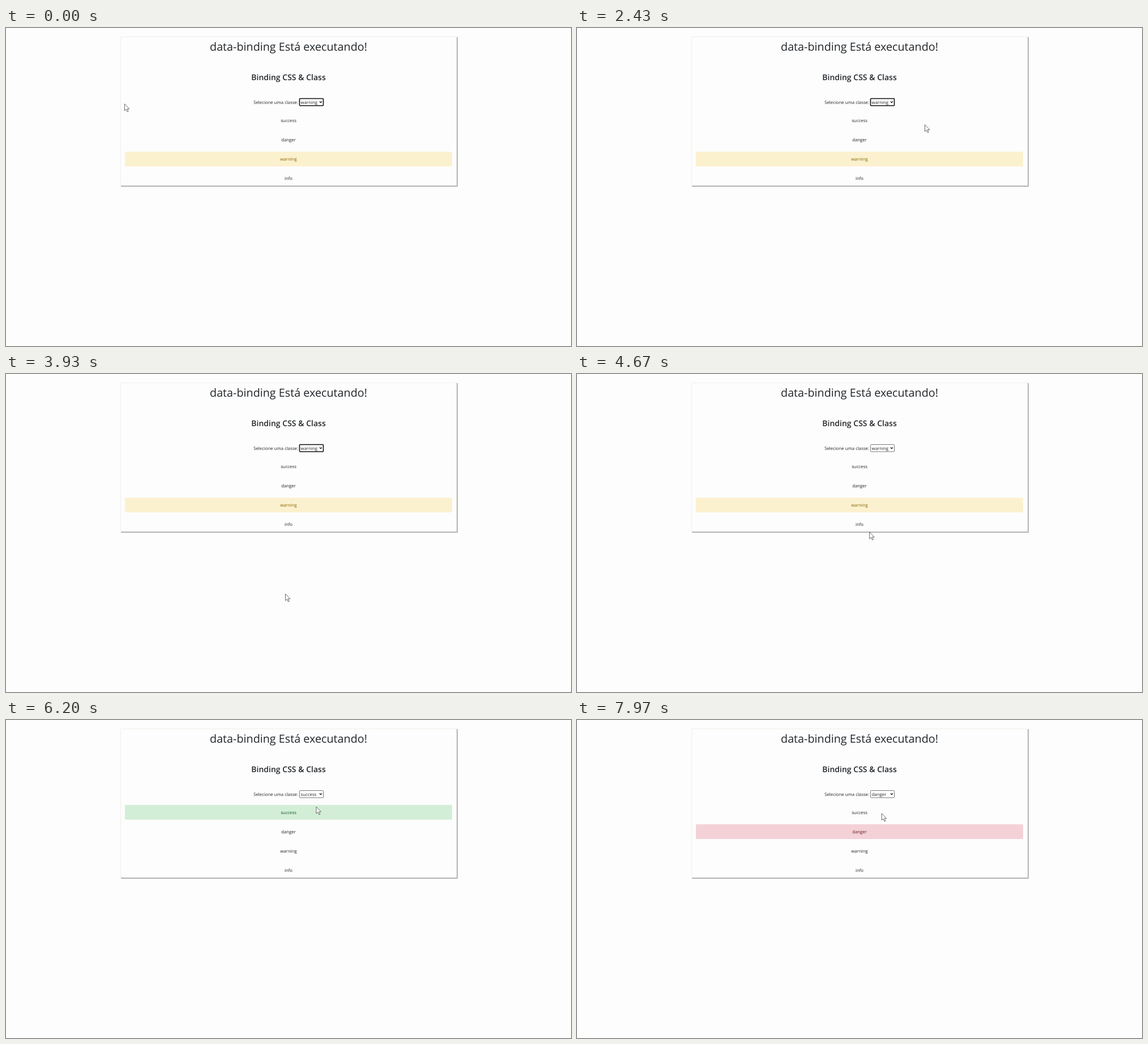
Recreate the animation shown at these times as an HTML page. Size 998 by 561 pixels, loop 8000 ms.

```html
<!DOCTYPE html>
<html lang="pt">
<head>
<meta charset="utf-8">
<title>data-binding</title>
<style>
  html, body { margin: 0; width: 100%; height: 100%; overflow: hidden; background: #fdfdfd; }
  svg { display: block; width: 100%; height: 100%; }
  text { font: 7.8px "Open Sans", "Noto Sans", sans-serif; fill: #212529; text-rendering: geometricPrecision; }
  .mid { text-anchor: middle; }
  .title { font-size: 19.75px; }
  .sub { font-size: 14px; font-weight: 600; }
  #box { fill: #fff; stroke: #777; }
  #box.focus { stroke: #111; stroke-width: 1.6; }
</style>
</head>
<body>
<svg viewBox="0 0 998 561">
  <rect width="998" height="561" fill="#fdfdfd"/>
  <path d="M202.5 278V15.5H796" fill="none" stroke="#efefe9"/>
  <path d="M797 16V279H203" fill="none" stroke="#b3b6af" stroke-width="2"/>
  <text class="mid title" x="499" y="39.5">data-binding Está executando!</text>
  <text class="mid sub" x="499" y="92.4">Binding CSS &amp; Class</text>
  <text x="437.2" y="134">Selecione uma classe:</text>
  <rect id="box" x="518.5" y="124.5" width="42" height="12.5" rx="1"/>
  <text id="value" x="520.6" y="134"></text>
  <path d="M553.9 129.5L555.9 131.7L557.9 129.5" fill="none" stroke="#111" stroke-width="1.2"/>
  <g id="rows"></g>
  <path id="cursor" d="M0 0V12L2.8 9.5L4.9 14L6.8 13.2L4.7 8.9H8.5Z" fill="#fff" stroke="#444" stroke-width=".8" stroke-linejoin="round"/>
</svg>
<script>
const LOOP = 8000;
const BLUR = 4300;
const $ = id => document.getElementById(id);

const names = ['success', 'danger', 'warning', 'info'];
const styles = {
  success: { ink: '#155724', fill: '#d3eed7', from: 6150 },
  danger: { ink: '#721c24', fill: '#f3d1d7', from: 7260 },
  warning: { ink: '#856404', fill: '#fcf1ce', from: 0 }
};

// Pointer: it rests at home, then makes each eased move in turn.
const home = { x: 209.4, y: 133.8 };
const menu = { x: 547.6, y: 132.8 };
const moves = [
  { at: 80, ms: 820, x: 725, y: 205 },
  { at: 900, ms: 460, x: 636, y: 190 },
  { at: 1360, ms: 800, x: 614.5, y: 170.6 },
  { at: 3200, ms: 650, x: 493.5, y: 387.8 },
  { at: 4400, ms: 600, ...menu },
  { at: 5750, ms: 300, x: 548, y: 153 },
  { at: 6250, ms: 300, ...menu },
  { at: 6750, ms: 350, x: 554.5, y: 167 },
  { at: 7350, ms: 400, x: 538.2, y: 164.8 }
];

function make(tag, attrs) {
  const el = document.createElementNS('http://www.w3.org/2000/svg', tag);
  for (const key in attrs) el.setAttribute(key, attrs[key]);
  return $('rows').appendChild(el);
}

const rows = names.map((name, i) => {
  const y = 149.7 + i * 34.25;
  const band = make('rect', { x: 210, y, width: 578, height: 26, rx: 2 });
  const label = make('text', { class: 'mid', x: 499, y: y + 15.8 });
  label.textContent = name;
  return { name, band, label };
});

const ease = u => u * u * (3 - 2 * u);

function pointer(t) {
  let { x, y } = home;
  for (const m of moves) {
    const k = ease(Math.min(1, Math.max(0, (t - m.at) / m.ms)));
    x += (m.x - x) * k;
    y += (m.y - y) * k;
  }
  return [x, y];
}

function chosenAt(t) {
  return Object.keys(styles)
    .filter(n => styles[n].from <= t)
    .reduce((a, b) => styles[a].from > styles[b].from ? a : b);
}

function draw(t) {
  const chosen = chosenAt(t);
  for (const { name, band, label } of rows) {
    const look = name === chosen ? styles[name] : { ink: '#212529', fill: 'none' };
    band.style.fill = look.fill;
    label.style.fill = look.ink;
  }
  $('value').textContent = chosen;
  $('box').classList.toggle('focus', t < BLUR);
  $('cursor').setAttribute('transform', `translate(${pointer(t)})`);
}

function tick() {
  draw(performance.now() % LOOP);
  requestAnimationFrame(tick);
}
tick();
</script>
</body>
</html>
```
